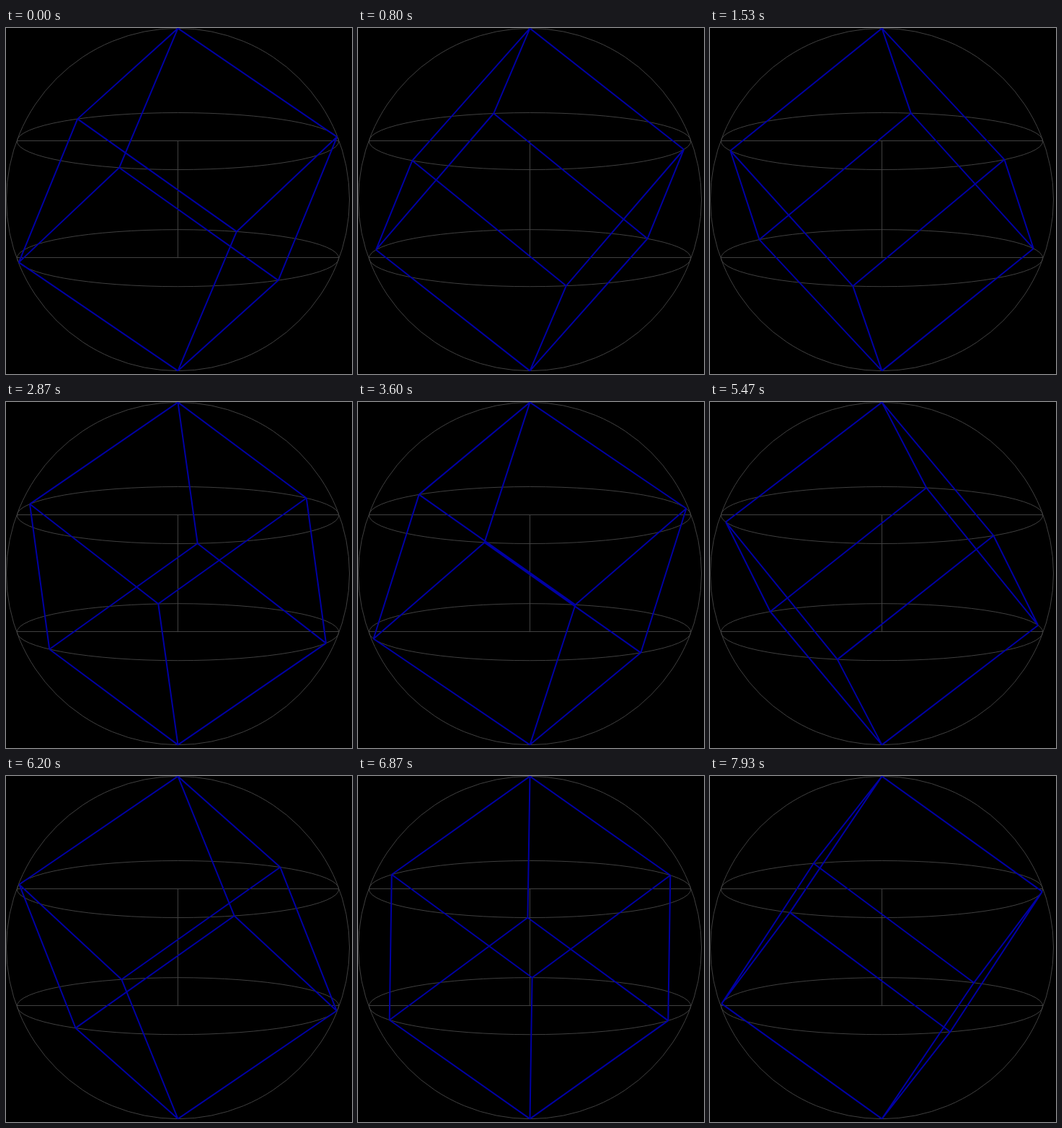
Animation, 480 px wide and 480 px high, one loop 8 s. Source, as an HTML page with a canvas:

```html
<!DOCTYPE html>
<html lang="en">
<head>
<meta charset="utf-8">
<title>Cube turning on its diagonal</title>
<style>
  html, body { margin: 0; width: 100%; height: 100%; overflow: hidden; background: #000; }
  canvas { display: block; width: 480px; height: 480px; }
</style>
</head>
<body>
<canvas id="stage" width="480" height="480"></canvas>
<script>
const ctx = document.getElementById('stage').getContext('2d');
const LOOP = 8000;
const CX = 238.5, CY = 238, R = 237.6;
const RING = { rx: 223.2, ry: 39.5, upper: 157, lower: 319.2 };
const START = -8.6, STEP = 2.13; // degrees
const TOP = [CX, CY - R], BOTTOM = [CX, CY + R];

function ringPoint(y, deg) {
  const a = deg * Math.PI / 180;
  return [CX + RING.rx * Math.cos(a), y + RING.ry * Math.sin(a)];
}

function line(a, b) {
  ctx.moveTo(a[0], a[1]);
  ctx.lineTo(b[0], b[1]);
}

function ellipse(y, rx, ry) {
  ctx.moveTo(CX + rx, y);
  ctx.ellipse(CX, y, rx, ry, 0, 0, Math.PI * 2);
}

function stroke(color, width) {
  ctx.strokeStyle = color;
  ctx.lineWidth = width;
  ctx.stroke();
}

function drawGuides() {
  ctx.beginPath();
  ellipse(CY, 238, R);
  for (const y of [RING.upper, RING.lower]) {
    ellipse(y, RING.rx, RING.ry);
    const row = Math.floor(y - 0.5) + 0.5;
    line([CX - RING.rx, row], [CX + RING.rx, row]);
  }
  line([CX, RING.upper], [CX, RING.lower]);
  stroke('#404040', 1);
}

function drawCube(angle) {
  ctx.beginPath();
  for (let i = 0; i < 3; i++) {
    const a = angle + i * 120;
    const high = ringPoint(RING.upper, a);
    const low = ringPoint(RING.lower, a + 60);
    line(TOP, high);
    line(high, low);
    line(high, ringPoint(RING.lower, a - 60));
    line(low, BOTTOM);
  }
  stroke('#0000a4', 2);
}

// Fifteen steps a second, each starting on a whole hundredth.
function stepAt(ms) {
  return Math.floor((Math.floor(ms / 10) + 0.5) * 0.15);
}

function draw(now) {
  ctx.fillStyle = '#000';
  ctx.fillRect(0, 0, 480, 480);
  drawGuides();
  drawCube(START + STEP * stepAt(now % LOOP));
}

let begin;
function tick(now) {
  if (begin === undefined) begin = now;
  draw(Math.max(0, now - begin));
  requestAnimationFrame(tick);
}

draw(0);
requestAnimationFrame(tick);
</script>
</body>
</html>
```
